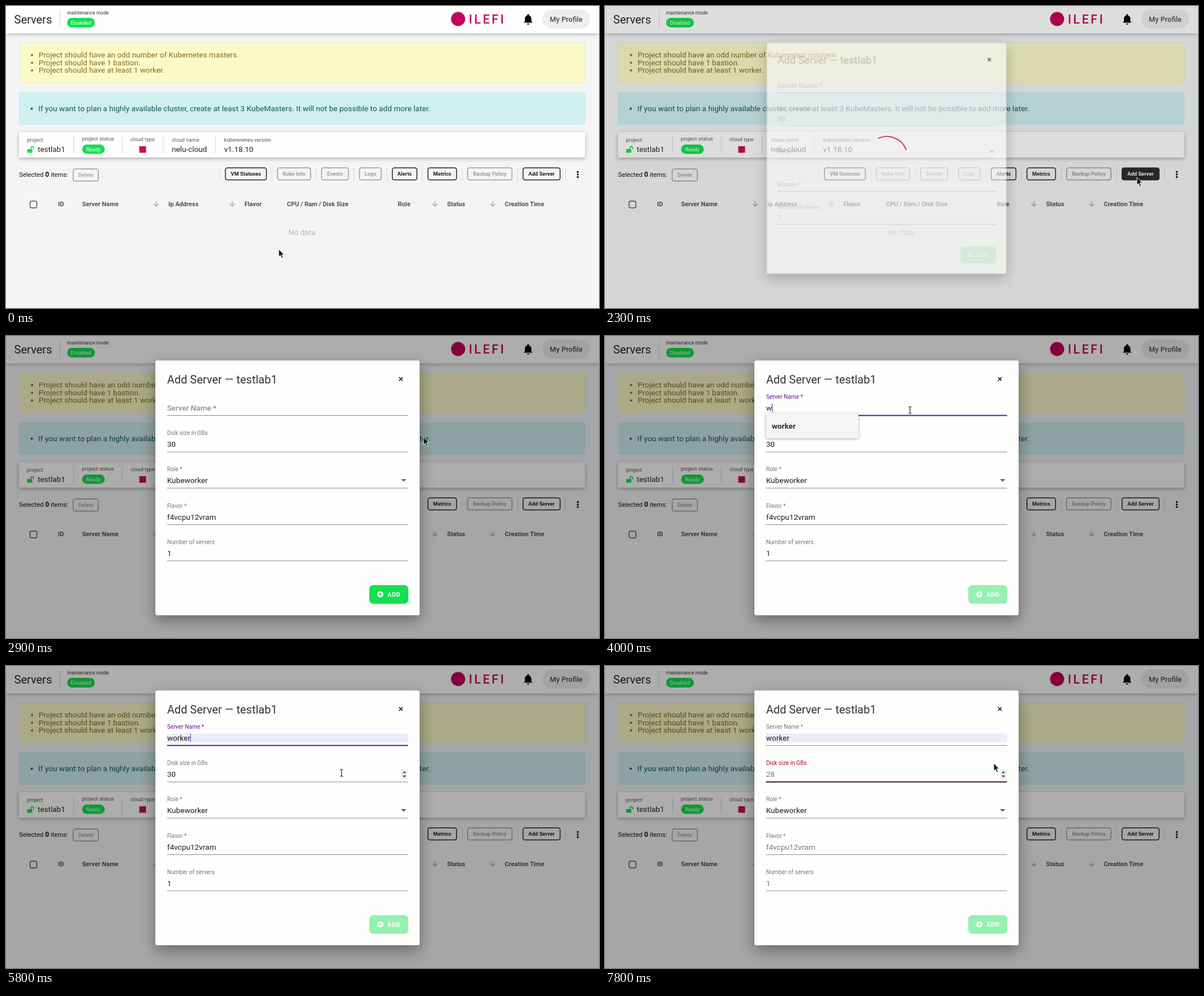
Recreate the animation shown at these times as an HTML page. Size 1048x534 px, loop 8 s.

```html
<!DOCTYPE html>
<html lang="en">
<head>
<meta charset="utf-8">
<title>Add server</title>
<style>
html, body { margin: 0; width: 100%; height: 100%; overflow: hidden; background: #f3f4f5; }
svg { display: block; width: 1048px; height: 534px; font-family: Roboto, sans-serif; }
.bar { filter: drop-shadow(0 1px 3px rgba(0,0,0,.32)); }
.card { filter: drop-shadow(0 2px 3px rgba(0,0,0,.3)); }
.sheet { filter: drop-shadow(0 9px 13px rgba(0,0,0,.38)); }
.popup { filter: drop-shadow(0 1px 2px rgba(0,0,0,.35)); }
</style>
</head>
<body>
<svg id="stage" viewBox="0 0 1048 534"></svg>
<script>
const LOOP = 8000, STEP = 100;
const GREEN = '#14df50', PINK = '#c5005c', PURPLE = '#6510a6', RED = '#b00030';
const PROJECT = 'testlab1';

const text = (x, y, size, str, fill = '#222', more = '') =>
  `<text x="${x}" y="${y}" font-size="${size}" fill="${fill}" ${more}>${str}</text>`;
const rect = (x, y, w, h, fill, more = '') =>
  `<rect x="${x}" y="${y}" width="${w}" height="${h}" fill="${fill}" ${more}/>`;
const path = (d, fill, more = '') => `<path d="${d}" fill="${fill}" ${more}/>`;
const line = (d, stroke, width = 1, more = '') =>
  path(d, 'none', `stroke="${stroke}" stroke-width="${width}" ${more}`);
const dot = (x, y, r, fill) => `<circle cx="${x}" cy="${y}" r="${r}" fill="${fill}"/>`;
const group = (attrs, body) => `<g ${attrs}>${body}</g>`;
const bold = 'font-weight="700"', medium = 'font-weight="500"', middle = 'text-anchor="middle"';
const mix = (a, b, k) => a + (b - a) * k;

const pill = (x, y, w, h, str) =>
  rect(x, y, w, h, GREEN, `rx="${h / 2}"`) + text(x + w / 2, y + h / 2 + 3.4, 9.3, str, '#fff', middle);

function button(x, w, str, color, fill = 'none', ink = color, weight = bold, y = 286.2) {
  return rect(x + .7, y, w - 1.4, 21.2, fill, `rx="3.5" stroke="${color}" stroke-width="1.5"`) +
    text(x + w / 2, y + 13.6, 9.3, str, ink, `${middle} ${weight}`);
}

function header() {
  return rect(0, 0, 1048, 48.5, '#fefefd', 'class="bar"') +
    text(14.5, 30.5, 20, 'Servers') +
    line('M95.5 8V39', '#d4d4d4') +
    text(108, 14.6, 8.6, 'maintenance mode', '#333') +
    pill(108, 21, 49, 17, 'Disabled') +
    dot(799, 23, 12.5, PINK) +
    text(818, 31, 21.5, 'ILEFI', PINK, `${medium} letter-spacing="3.5"`) +
    path('M915 29.5L917 27V22.5C917 19 919 17 921.3 16.5V15.7A1.5 1.5 0 0 1 924.3 15.7V16.5C926.5 17 928.5 19 928.5 22.5V27L930.5 29.5Z', '#080808') +
    path('M920.8 31H924.8A2 2 0 0 1 920.8 31Z', '#080808') +
    rect(948, 6, 84, 34, '#eeeeee', 'rx="17"') +
    text(990, 27.5, 12.8, 'My Profile', '#4b4b4b', `${middle} ${medium}`);
}

function notices() {
  const hints = ['Project should have an odd number of Kubernetes masters.',
    'Project should have 1 bastion.', 'Project should have at least 1 worker.'];
  const tip = 'If you want to plan a highly available cluster, create at least 3 KubeMasters. ' +
    'It will not be possible to add more later.';
  return rect(23.5, 65.5, 1000, 69.5, '#fafac8', 'stroke="#f1eda2"') +
    hints.map((s, i) => dot(46, 86.7 + i * 13.6, 1.9, '#806818') +
      text(57.7, 91.2 + i * 13.6, 13.45, s, '#856c20')).join('') +
    rect(23, 152.5, 1001, 57.5, '#d0efef') +
    dot(45.5, 181.5, 1.9, '#0f5555') + text(57, 186, 13.64, tip, '#115858');
}

function summary() {
  const items = [[37, 239.5, 'project'], [134, 238, 'project status'], [220, 238.7, 'cloud type'],
    [293, 239.5, 'cloud name', 'nelu-cloud'], [385.5, 239.5, 'kuberenetes version', 'v1.18.10']];
  return rect(23, 223, 1000.5, 45, '#fefefd', 'class="card"') +
    items.map(([x, y, label, value]) => text(x, y, 9.3, label, '#555') +
      (value ? text(x, 258, 13.5, value) : '')).join('') +
    [119.5, 205.5, 277.5, 370.5].map(x => line(`M${x} 231V261`, '#d6d6d6')).join('') +
    rect(37.5, 253, 9, 6.5, GREEN, 'rx="1"') +
    line('M44 253V251A2.4 2.4 0 0 1 48.8 251V253.5', GREEN, 1.6) +
    text(56, 258, 13.5, PROJECT) +
    pill(134.5, 245, 40, 16.5, 'Ready') +
    rect(235.5, 248, 12, 11.5, '#c8104a');
}

function addButton(t) {
  if (t < 1500 || t >= 2500) return button(913, 67, 'Add Server', '#222');
  const fill = t >= 2400 ? '#757575' : t >= 1900 ? '#2a2d2f' : '#3a3f43';
  return button(913, 67, 'Add Server', t >= 2400 ? '#4a4a4a' : fill, fill, t >= 2400 ? '#dcdcdc' : '#fff');
}

function toolbar(t) {
  const off = '#9b9b9b', on = '#222';
  const list = [[387, 74, 'VM Statuses', on], [479, 60, 'Kube Info', off], [557, 49, 'Events', off],
    [624, 40, 'Logs', off], [682, 45, 'Alerts', on], [745, 52, 'Metrics', on], [815, 80, 'Backup Policy', off]];
  return text(23, 302.3, 11.3, 'Selected <tspan font-weight="700" font-size="12">0</tspan> items:', '#111') +
    button(118, 46, 'Delete', off, 'none', off, medium, 288.2) +
    list.map(b => button(...b)).join('') + addButton(t) +
    [378, 470, 548, 614.5, 673.5, 736, 806.5, 904.5, 988.5].map(x => line(`M${x} 286V310`, '#d9d9d9')).join('') +
    [293.5, 298, 302.5].map(y => dot(1010.5, y, 1.8, '#111')).join('');
}

function table() {
  const heads = [[92, 'ID'], [134.5, 'Server Name'], [287, 'Ip Address'], [421.5, 'Flavor'],
    [496.5, 'CPU / Ram / Disk Size'], [692.5, 'Role'], [779.5, 'Status'], [881.5, 'Creation Time']];
  return rect(42.5, 345, 12, 12, 'none', 'rx="3" stroke="#555" stroke-width="1.5"') +
    heads.map(([x, s]) => text(x, 353.7, 11, s, '#505050', bold)).join('') +
    [265.5, 400, 758, 860].map(x => line(`M${x} 345V354M${x - 4.5} 349.5L${x} 354L${x + 4.5} 349.5`, '#a5a5a5', 1.3)).join('') +
    text(523, 404.5, 13.6, 'No data', '#b4b4b4', middle);
}

// One form row; `lift` moves the label from the resting place (0) to the top (1).
function field(y, label, value, { ink = '#1c1c1c', tint = '#757575', lift = 1, stroke = '#8c8c8c', width = 1.2 } = {}) {
  return text(284.7, mix(y - 9, y - 29.7, lift), mix(13.6, 10.2, lift), label, tint) +
    line(`M284.5 ${y}H710.5`, stroke, width) + text(284.7, y - 9, 13.6, value, ink);
}

function nameField(t) {
  const focus = t >= 3800 && t < 7100;
  const filled = t >= 4300;
  const value = filled ? 'worker' : t >= 4000 ? 'w' : '';
  const blink = t < 4300 || t >= 5500 && (t - 5500) % 1000 < 500;
  const caret = filled ? 326 : value ? 295.5 : 285;
  return (filled ? rect(284.5, 119.5, 426, 15.5, '#e8ecfc') : '') +
    field(140.5, 'Server Name *', value, {
      lift: t < 3800 ? 0 : t < 3900 ? .5 : 1,
      tint: focus ? PURPLE : '#757575',
      stroke: focus ? PURPLE : '#8c8c8c', width: focus ? 2 : 1.2
    }) +
    (focus && blink ? line(`M${caret} 119.5V134.5`, PURPLE) : '');
}

function diskField(t, ink, [x, y]) {
  const focus = t >= 7100, bad = t >= 7500;
  const value = t >= 7400 ? 28 : t >= 7200 ? 29 : 30;
  const hover = t >= 5500 && x > 285 && x < 711 && y > 180 && y < 206;
  return field(205, 'Disk size in GBs', value, {
    ink, tint: bad ? RED : focus ? PURPLE : '#757575',
    stroke: bad ? '#42202d' : focus ? PURPLE : '#8c8c8c', width: focus ? 2 : 1.2
  }) + (focus || hover ? rect(698, 183, 12, 17, '#eeeeee') +
    path('M700.8 189.5L704 185.8L707.2 189.5ZM700.8 193.5L704 197.2L707.2 193.5Z', '#505050') : '');
}

// Opening stages of the dialog: scale, vertical centre, sheet, content and scrim opacity.
function opening(t) {
  if (t < 2400) return { scale: .906, cy: 269.2, sheet: .6, content: .4, scrim: .13 };
  if (t < 2500) return { scale: .9975, cy: 269.2, sheet: 1, content: .9, scrim: .27 };
  return { scale: 1, cy: 268.5, sheet: 1, content: 1, scrim: .32 };
}

function modal(t, mouse) {
  if (t < 2300) return '';
  const { scale, cy, sheet, content, scrim } = opening(t);
  const ink = t < 2600 || t >= 7500 ? '#777' : '#1c1c1c';
  const ready = t >= 2700 && t < 3900 || t >= 4300 && t < 5500 || t >= 6000 && t < 7200;
  const flavor = t >= 2400, role = t >= 2600;
  const form = text(284.7, 83.5, 20, `Add Server — ${PROJECT}`, '#333') +
    nameField(t) + diskField(t, ink, mouse) +
    field(269, 'Role *', role ? 'Kubeworker' : '', { lift: +role }) +
    path('M698 253H707.5L702.7 257.8Z', '#666') +
    field(333.5, 'Flavor *', flavor ? 'f4vcpu12vram' : '', { lift: +flavor, ink }) +
    field(397.5, 'Number of servers', 1, { ink }) +
    rect(642, 440.5, 69, 33, GREEN, `rx="7" opacity="${ready ? 1 : .45}"`) +
    dot(661.5, 456.7, 5.3, '#fff') +
    line('M658.5 456.7H664.5M661.5 453.7V459.7', ready ? GREEN : '#96f0ae', 1.7) +
    text(674, 461, 11, 'ADD', '#fff', `${bold} letter-spacing=".5"`) +
    (t >= 4000 && t < 5500 ? rect(284.5, 136.5, 163.5, 44.5, t >= 4500 ? '#ececee' : '#f6f5f6', 'rx="2" class="popup"') +
      text(294.8, 163.7, 13.6, 'worker', '#2d2d2d', bold) : '');
  return rect(0, 0, 1048, 534, '#000', `opacity="${scrim}"`) +
    group(`transform="translate(497.5 ${cy}) scale(${scale}) translate(-497.5 -268.5)" opacity="${sheet}"`,
      rect(264, 43.3, 467, 450.5, '#fefefc', 'rx="3.5" class="sheet"') +
      line('M694.7 72.8L701 79.2M701 72.8L694.7 79.2', '#333', 1.9) +
      group(`opacity="${content}"`, form)) +
    (t < 2400 ? line('M483 234A36.5 36.5 0 0 1 532.5 254.5', '#d13a82', 2.2) : '');
}

// Pointer stops: time, x, y.
const STOPS = [[0, 482, 430], [700, 482, 430], [1500, 940, 303], [2400, 940, 303], [2900, 738, 179],
  [3000, 738, 179], [3400, 539, 131], [4200, 539, 131], [4700, 400, 158], [5400, 400, 158],
  [5800, 593, 189], [6300, 714, 197], [6400, 714, 197], [6800, 704, 195], [7400, 704, 195],
  [7800, 687, 172], [LOOP, 687, 172]];

function mouseAt(t) {
  const i = STOPS.findIndex(s => s[0] > t);
  const [t0, x0, y0] = STOPS[i - 1], [t1, x1, y1] = STOPS[i];
  const k = (t - t0) / (t1 - t0);
  return [mix(x0, x1, k), mix(y0, y1, k)];
}

function cursor(t, [x, y]) {
  const popup = t >= 4000 && t < 5500 && x < 448 && y > 136;
  const overInput = t >= 2500 && !popup && x > 285 && x < 698 &&
    (y > 119 && y < 137 || y > 182 && y < 201);
  let shape;
  if (t >= 1500 && t < 2300) {
    shape = path('M-1.5 1.5Q0 -.5 1.5 1.5V6.5Q3 5.5 4 7Q6 6 7 7.7Q9 7 9.7 9V12Q9 14 8.5 15.5H0Q-2 12 -4 10Q-4 8 -1.5 9Z',
      '#fff', 'stroke="#222" stroke-width="1.2" stroke-linejoin="round"') +
      line('M2 8.5V11M5 9V11', '#555', .8);
  } else if (overInput) {
    shape = line('M-2.7 -6H-.7L0 -5.3L.7 -6H2.7M0 -5.5V5.5M-2.7 6H-.7L0 5.3L.7 6H2.7', '#222', 1.2);
  } else {
    shape = path('M0 0V13.5L3.1 10.7L5.5 16L7.7 15L5.4 9.8H9.5Z', '#111', 'stroke="#fff" stroke-width=".9"');
  }
  return group(`transform="translate(${x} ${y})"`, shape);
}

const stage = document.getElementById('stage');
const backdrop = header() + notices() + summary() + table();
let shown = -1;

function draw(now) {
  const t = Math.floor(now % LOOP / STEP) * STEP;
  if (t !== shown) {
    const mouse = mouseAt(t);
    stage.innerHTML = rect(0, 0, 1048, 534, '#f3f4f5') + backdrop + toolbar(t) + modal(t, mouse) + cursor(t, mouse);
    shown = t;
  }
  requestAnimationFrame(() => draw(performance.now()));
}
draw(0);
</script>
</body>
</html>
```
